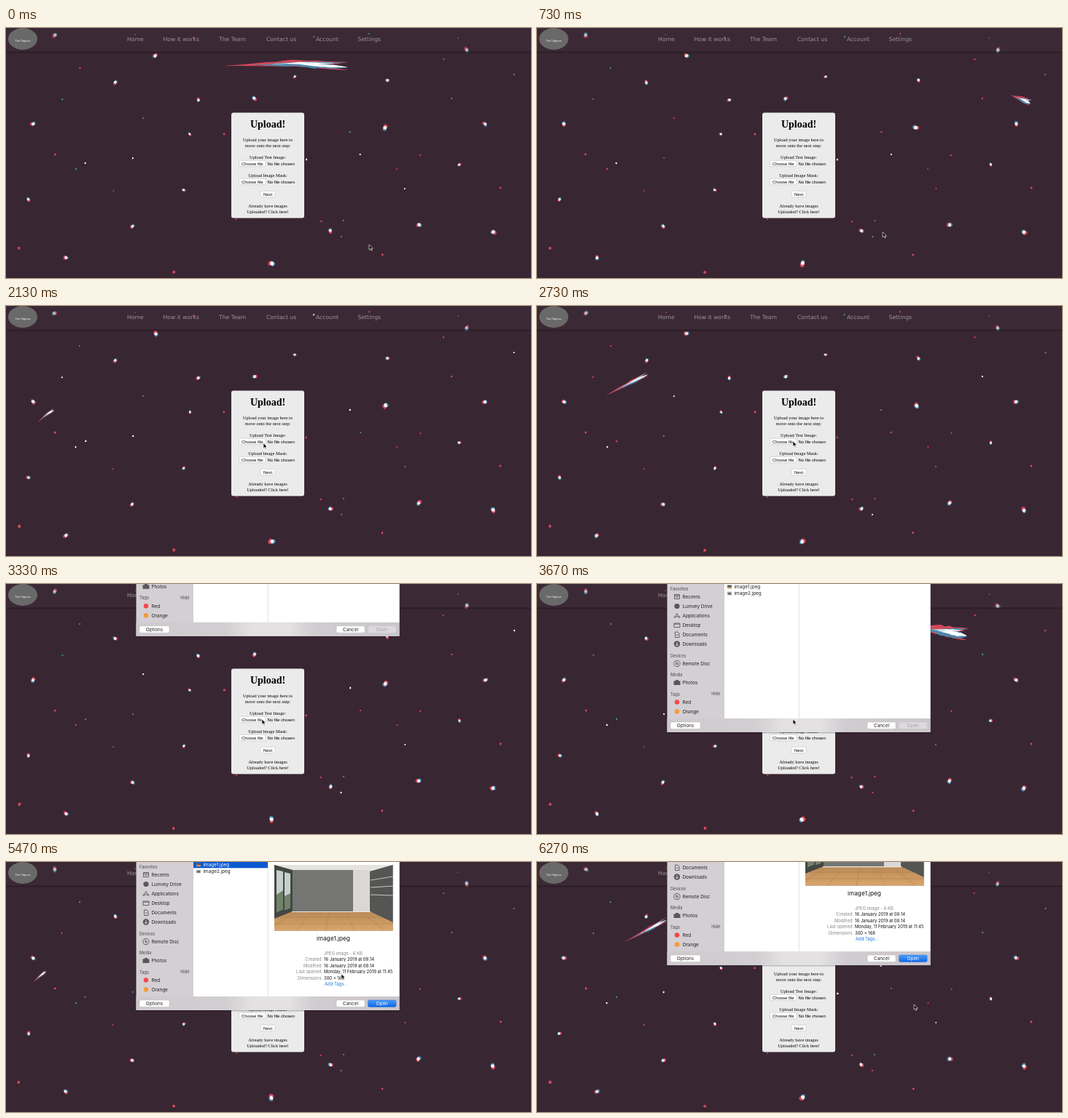
Recreate the animation shown at these times as an HTML page. Size 720 by 344 pixels, loop 6.34 s.

```html
<!DOCTYPE html>
<html lang="en">
<head>
<meta charset="utf-8">
<title>Image upload</title>
<style>
  html, body { margin: 0; width: 100%; height: 100%; overflow: hidden; background: #392633; }
  svg { display: block; width: 100%; height: 100%; }
  text { white-space: pre; }
  .nav { font: 7.7px "DejaVu Sans", sans-serif; fill: #9e949b; }
  .serif { font: 6.35px "Liberation Serif", serif; fill: #000; }
  .title { font: bold 14px "Liberation Serif", serif; fill: #000; }
  .form { font: 5.9px "Liberation Sans", sans-serif; fill: #000; }
  .brand { font: 3.7px "Liberation Sans", sans-serif; fill: #fff; }
  .ui { font: 6.4px Inter, sans-serif; fill: #222; }
  .head { font: 500 5.6px Inter, sans-serif; fill: #5d585d; }
  .meta { font: 5.9px Inter, sans-serif; fill: #111; }
  .label { font: 5.9px Inter, sans-serif; fill: #858585; }
  .link { font: 5.9px Inter, sans-serif; fill: #1a78dc; }
  .name { font: 8.2px Inter, sans-serif; fill: #111; }
</style>
</head>
<body>
<svg id="stage" viewBox="0 0 720 344" preserveAspectRatio="none">
  <defs>
    <linearGradient id="footer">
      <stop offset="0" stop-color="#cfcacf"/><stop offset=".34" stop-color="#d2ced1"/>
      <stop offset=".44" stop-color="#e3e1e2"/><stop offset=".58" stop-color="#e3e1e2"/>
      <stop offset=".68" stop-color="#d0ccd0"/><stop offset="1" stop-color="#cbc6cb"/>
    </linearGradient>
    <linearGradient id="blue" x2="0" y2="1">
      <stop stop-color="#4d9bf8"/><stop offset="1" stop-color="#0b66e4"/>
    </linearGradient>
    <linearGradient id="edge" x2="0" y2="1">
      <stop stop-color="#000" stop-opacity=".35"/><stop offset="1" stop-color="#000" stop-opacity="0"/>
    </linearGradient>
    <linearGradient id="wood" x2="0" y2="1">
      <stop stop-color="#b98a58"/><stop offset="1" stop-color="#d9a66b"/>
    </linearGradient>
    <clipPath id="photoClip"><rect x="368" y="4" width="162.500" height="90.500"/></clipPath>
  </defs>

  <rect width="720" height="344" fill="#392633"/>
  <path id="red" fill="#d5485b"/>
  <path id="blueInk" fill="#4b87a8"/>
  <path id="white" fill="#fff"/>

  <g id="page">
    <rect width="720" height="33" fill="#40303b" opacity=".3"/>
    <rect y="32.500" width="720" height="3" fill="url(#edge)"/>
    <ellipse cx="23" cy="15" rx="20" ry="15" fill="#6a6969"/>
    <rect x="309" y="116.500" width="100" height="145" rx="3" fill="#ebebeb"/>
  </g>

  <g id="dialog">
    <rect x="177.500" y="-20" width="363" height="225.500" rx="2" opacity=".22"/>
    <rect x="178.500" y="-20" width="361" height="224" fill="#d4cfd3"/>
    <rect x="178.500" y="185" width="361" height="19" fill="url(#footer)"/>
    <rect x="257" y="-20" width="282.500" height="205" fill="#fff"/>
    <path d="M359.500-20V185" stroke="#dcdcdc" stroke-width=".8"/>
    <g id="icons" fill="none" stroke="#5a565a" stroke-width=".9">
      <circle cx="192" cy="30.500" r="3.600" fill="#5a565a" stroke="none"/>
      <path d="M188.500 14.500h7v6h-7zM188.500 16h7M190 18h4"/>
      <path d="M188.500 47l3.500-6.500 3.500 6.500M187.500 45h9"/>
      <path d="M188 54h8v5.500h-8zM188 55.200h8"/>
      <path d="M189.500 66h3.500l2 2v5.500h-5.500zM191 70h2.500"/>
      <circle cx="192" cy="82.500" r="4.200" fill="#5a565a" stroke="none"/>
      <path d="M192 80v4.500M190 83l2 2 2-2" stroke="#e4e0e3"/>
      <circle cx="192" cy="109.500" r="4.100"/><circle cx="192" cy="109.500" r="1.300"/>
      <path d="M190 106.500l4 6" stroke-width=".5"/>
      <path d="M187.500 133.500h2l1-1.500h3l1 1.500h2v5.500h-9z" fill="#5a565a" stroke="none"/>
      <circle cx="192" cy="162.500" r="3.200" fill="#f8454d" stroke="none"/>
      <circle cx="192" cy="175.500" r="3.200" fill="#f59a35" stroke="none"/>
    </g>
    <rect id="rowMark" x="257" y="-1" width="102" height="9.300" fill="#0b59d2"/>
    <g id="thumbs">
      <path d="M261 1.500h6v4.600h-6z" fill="#5d5a58"/><path d="M261 4h6v2.100h-6z" fill="#c6935e"/>
      <path d="M261 10.700h6v4.600h-6z" fill="#aaa7aa"/><path d="M262 12.500h4v1.800h-4z" fill="#5b5961"/>
    </g>
    <g id="preview">
      <g clip-path="url(#photoClip)">
        <rect x="368" y="4" width="163" height="91" fill="#777674"/>
        <path d="M368 4h163l-32 9H393z" fill="#e4e3df"/>
        <path d="M368 4l25 7v58l-25 9z" fill="#434743"/>
        <path d="M371 11l9 2v52l-9 4zM382 14l8 2v47l-8 3z" fill="#c5d0cd"/>
        <path d="M371 45l9-6v26l-9 4zM382 47l8-4v20l-8 3z" fill="#71816a"/>
        <path d="M393 11h83v57h-83z" fill="#757674"/>
        <path d="M476 11h23v57h-23z" fill="#d9d8d4"/>
        <path d="M499 13l32-9v80l-32-16z" fill="#555554"/>
        <path d="M500 25l31-5M500 35l31-2M500 45l31 1" stroke="#c9c7c2"/>
        <path d="M368 78l25-10h106l32 15v12H368z" fill="url(#wood)"/>
        <path d="M399 68l-31 20M420 68l-22 27M443 68l-5 27M465 68l13 27M486 68l34 27M376 76h140M368 85h163" stroke="#a87849" stroke-width=".5"/>
        <path d="M392 68.500h108" stroke="#eee9df" stroke-width="1.200"/>
      </g>
    </g>
    <g id="buttons"></g>
  </g>
  <path id="cursor" d="M0 0V7.200L1.700 5.700 2.900 8.400 4 7.900 2.900 5.300H5.100Z" stroke="#fff" stroke-width=".65"/>
</svg>
<script>
const LOOP = 6340, STEP = 200 / 3, SKY_LOOP = 3410, SKY_SHIFT = 1350;
const $ = id => document.getElementById(id);

function add(parent, tag, attrs, content = "") {
  const node = document.createElementNS("http://www.w3.org/2000/svg", tag);
  for (const key in attrs) node.setAttribute(key, attrs[key]);
  node.textContent = content;
  return parent.appendChild(node);
}
const text = (parent, cls, x, y, content, anchor = "start") =>
  add(parent, "text", { class: cls, x, y, "text-anchor": anchor }, content);

function button(parent, x, y, width, height, label, cls) {
  const box = add(parent, "rect", { x, y, width, height, rx: 1.7, fill: "#fff", stroke: "#b9b5b9", "stroke-width": .5 });
  const caption = text(parent, cls, x + width / 2, y + height / 2 + 2.2, label, "middle");
  return { box, caption };
}

// Page
const page = $("page"), dialog = $("dialog");
text(page, "brand", 23, 18.7, "The Tidymox", "middle");
[["Home", 166], ["How it works", 215.5], ["The Team", 292], ["Contact us", 357], ["Account", 425], ["Settings", 482.5]]
  .forEach(([label, x]) => text(page, "nav", x, 18, label));
text(page, "title", 359, 137, "Upload!", "middle");
[["Upload your image here to", 156], ["move onto the next step:", 164], ["Upload Test Image:", 180],
 ["Upload Image Mask:", 205], ["Already have images", 247], ["Uploaded? Click here!", 255]]
  .forEach(([line, y]) => text(page, "serif", 359, y, line, "middle"));
for (const y of [182.2, 207.2]) {
  button(page, 319.5, y, 36.5, 8.4, "Choose file", "form");
  text(page, "form", 358.6, y + 6.4, "No file chosen");
}
button(page, 349, 224.2, 20, 8.6, "Next", "form");

// File dialog
[["Favorites", 8.5], ["Devices", 100.5], ["Media", 127], ["Tags", 153.5]]
  .forEach(([label, y]) => text(dialog, "head", 183, y, label));
text(dialog, "head", 251.5, 153.2, "Hide", "end");
[["Recents", 20], ["Lumvey Drive", 33], ["Applications", 46], ["Desktop", 59], ["Documents", 72], ["Downloads", 85],
 ["Remote Disc", 112], ["Photos", 138], ["Red", 165], ["Orange", 178]]
  .forEach(([label, y]) => text(dialog, "ui", 199.5, y, label));
const firstFile = text(dialog, "ui", 270.5, 6, "image1.jpeg");
text(dialog, "ui", 270.5, 15, "image2.jpeg");

const preview = $("preview");
text(preview, "name", 449, 108, "image1.jpeg", "middle");
text(preview, "label", 436, 127.5, "JPEG image - 6 KB");
[["Created", "16 January 2019 at 08:14"], ["Modified", "16 January 2019 at 08:14"],
 ["Last opened", "Monday, 11 February 2019 at 11:45"], ["Dimensions", "300 × 168"]]
  .forEach(([label, value], i) => {
    text(preview, "label", 432.5, 136 + i * 8.5, label, "end");
    text(preview, "meta", 436, 136 + i * 8.5, value);
  });
text(preview, "link", 437, 170, "Add Tags...");

const buttons = $("buttons");
button(buttons, 183, 190, 41, 9.5, "Options", "ui");
button(buttons, 453, 190, 39, 9.5, "Cancel", "ui");
const openButton = button(buttons, 496.5, 190, 38.5, 9.5, "Open", "ui");

// Night sky: x, y, radius
const stars = [
  [67, 10, 3.2], [205, 38, 3.2], [150, 75, 2.7], [264, 99, 2.6], [341, 97, 2.9], [396, 67, 2.1], [523, 72, 2.7],
  [632, 30, 3.2], [657, 132, 3.1], [520, 137, 3.7], [37, 132, 3.1], [252, 146, 2.1], [244, 223, 2.3], [31, 236, 2.6],
  [173, 273, 2.8], [82, 316, 3], [364, 324, 3.9], [445, 279, 3], [566, 271, 3.3], [668, 281, 3.5], [622, 188, 2.3],
  [174, 179, 1.2], [77, 98, 1.2], [188, 124, 1.2], [96, 194, 1.3], [109, 186, 1.3], [422, 12, 1.6], [498, 8, 1.4],
  [611, 97, 1.3], [697, 64, 1.2], [472, 143, 1.3], [486, 174, 1.2], [412, 181, 1.4], [547, 221, 1.1],
  [463, 265, 1.2], [460, 287, 1.2], [101, 55, 1.2]
];
const redStars = [
  [67, 174, 1.5], [147, 224, 1], [18, 303, 2.1], [230, 336, 2], [299, 146, 1.5], [258, 13, 1.4], [177, 9, 1],
  [620, 14, 1], [600, 43, 1.1], [536, 194, 1], [568, 175, 1.1], [678, 220, 1.5], [432, 266, 1.2], [516, 312, 1.5], [316, 263, 1]
];
const arc = [[20, 180], [55, 150], [95, 123], [151, 94], [178, 79], [240, 60], [302, 52], [400, 49], [469, 53], [592, 70], [687, 107]];
// time, tail x, head x
const flight = [[-200, 30, 32], [0, 38, 55], [670, 95, 151], [800, 122, 178], [1350, 302, 469], [1610, 512, 592], [2100, 655, 680], [2670, 681, 687]];
// time, x, y
const pointer = [
  [0, 498, 298], [500, 496, 296], [1400, 365, 204], [1600, 365, 204], [2300, 351, 186], [3900, 351, 186], [4600, 300, 11],
  [4800, 300, 11], [5000, 290, 4], [5130, 290, 4], [5470, 460, 154], [5900, 515, 194], [6270, 517, 196]
];

const clamp = u => Math.max(0, Math.min(1, u));
const smooth = u => u * u * (3 - 2 * u);
const random = seed => { const v = Math.sin(seed * 12.9898 + 4.1) * 43758.5453; return v - Math.floor(v); };

function track(keys, at, ease = u => u) {
  let i = 1;
  while (i < keys.length - 1 && at > keys[i][0]) i++;
  const a = keys[i - 1], b = keys[i], u = ease(clamp((at - a[0]) / (b[0] - a[0])));
  return a.slice(1).map((v, k) => v + (b[k + 1] - v) * u);
}

const polygon = points => "M" + points.map(p => p.map(v => v.toFixed(2)).join(" ")).join("L") + "Z";

function blob(x, y, r, seed) {
  return polygon(Array.from({ length: 8 }, (_, i) => {
    const reach = r * (.78 + .4 * random(seed + i * 3.7)), a = i * Math.PI / 4;
    return [x + Math.cos(a) * reach, y + Math.sin(a) * reach * 1.08];
  }));
}

// A rough tapered brush stroke along the arc, shifted sideways by `shift`
function brush(tail, head, from, to, width, shift, seed) {
  const upper = [], lower = [];
  for (let i = 0; i <= 14; i++) {
    const u = i / 14, x = tail + (head - tail) * (from + (to - from) * u);
    const y = track(arc, x)[0], slope = (track(arc, x + 4)[0] - track(arc, x - 4)[0]) / 8;
    const n = Math.hypot(1, slope), spread = width * Math.sin(Math.PI * Math.pow(u, 1.5));
    const side = (w, k) => {
      const d = shift * u + w * (.65 + .5 * random(seed + i * 2.3 + k));
      return [x - slope / n * d, y + d / n];
    };
    upper.push(side(-spread - .2, 0));
    lower.unshift(side(spread + .2, 50));
  }
  return polygon(upper.concat(lower));
}

function drawSky(phase, tick) {
  const pale = phase > 2350 && phase < 3060;
  const ink = { red: "", blue: "", white: "" };
  stars.forEach(([x, y, r], i) => {
    const seed = i * 17.3 + tick * 5.1, a = random(seed) * Math.PI * 2, off = r * (pale ? .3 : .42);
    const dx = Math.cos(a) * off, dy = Math.sin(a) * off;
    x += (random(seed + 1) - .5) * .9;
    if (r < 1.8 && !pale) {
      ink[["white", "blue", "red"][Math.floor(random(seed + 2) * 3)]] += blob(x, y, r * .95, seed);
      return;
    }
    ink.red += blob(x + dx, y + dy, r * .86, seed + 3);
    if (!pale) ink.blue += blob(x - dx, y - dy, r * .86, seed + 5);
    ink.white += blob(x - dx * .2, y - dy * .2, r * (pale ? .95 : .66), seed + 7);
  });
  redStars.forEach(([x, y, r], i) => {
    const seed = 900 + i * 11.7 + tick * 3.3;
    ink.red += blob(x + random(seed) - .5, y, r, seed);
    if (i % 3 == 0 && pale) ink.white += blob(x - r * .7, y - .5, r * .6, seed + 4);
  });

  const time = phase > SKY_LOOP - 200 ? phase - SKY_LOOP : phase;
  if (time < 2740) {
    const [tail, head] = track(flight, time), length = head - tail, seed = tick * 7.9;
    const width = Math.min(1.5 + length * .028 + Math.max(0, head - 480) * .05, 2 + length * .1);
    ink.red += brush(tail, head, 0, .94, width * .55, -width * .55, seed)
      + brush(tail, head, .04, 1, width * .2, width * .8, seed + 1)
      + brush(tail, head, .3, 1, width * .15, -width * .95, seed + 2);
    if (!pale) {
      ink.blue += brush(tail, head, .22, 1, width * .62, width * .25, seed + 3)
        + brush(tail, head, .4, .98, width * .15, -width * .8, seed + 4);
      ink.white += brush(tail, head, .5, .99, width * .3, width * .15, seed + 5)
        + brush(tail, head, .38, .88, width * .12, -width * .5, seed + 6);
    }
  }
  $("red").setAttribute("d", ink.red);
  $("blueInk").setAttribute("d", ink.blue);
  $("white").setAttribute("d", ink.white);
}

function render(now) {
  const frame = Math.floor((now % LOOP + 4) / STEP) % 95, t = frame * STEP;
  drawSky((t + SKY_SHIFT) % SKY_LOOP, Math.floor(frame / 2));

  const shown = smooth(clamp((t - 3200) / 330)) - smooth(clamp((t - 6143) / 340));
  dialog.setAttribute("transform", `translate(0 ${(-206 * (1 - shown)).toFixed(2)})`);
  dialog.style.display = shown > 0 ? "" : "none";

  const selected = t > 5060;
  $("rowMark").style.display = preview.style.display = selected ? "" : "none";
  firstFile.style.fill = selected ? "#fff" : "";
  openButton.box.setAttribute("fill", selected ? "url(#blue)" : "#dcd9dc");
  openButton.box.setAttribute("stroke", selected ? "#2b72d4" : "#c8c4c8");
  openButton.caption.style.fill = selected ? "#fff" : "#aaa7aa";

  $("cursor").setAttribute("transform", `translate(${track(pointer, t, smooth).map(v => v.toFixed(2))})`);
}

const start = performance.now();
function loop() {
  render(performance.now() - start);
  requestAnimationFrame(loop);
}
loop();
</script>
</body>
</html>
```
